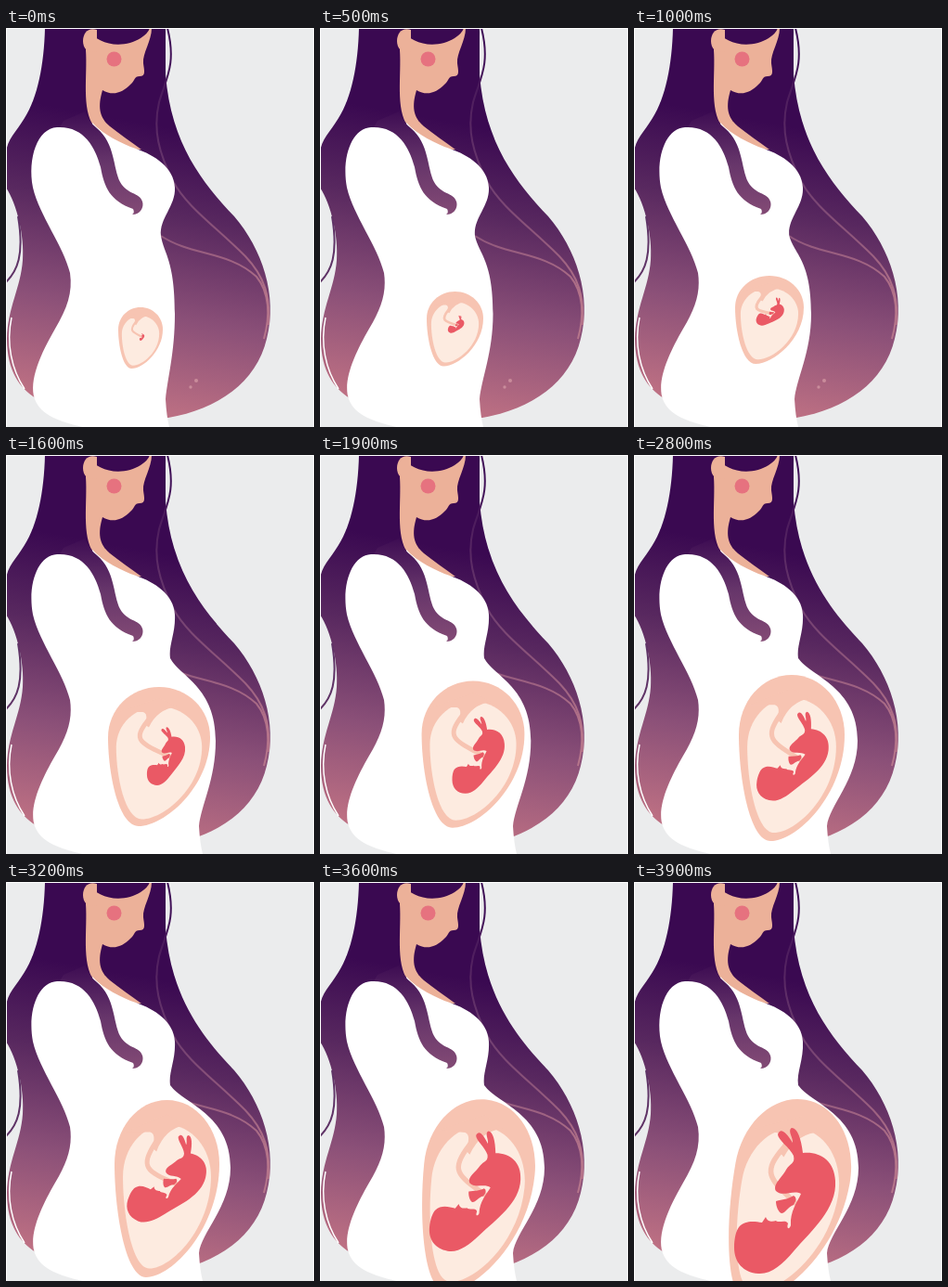
Write an HTML page that moves like this. It is 332x430 px and loops after 8 s.

```html
<!DOCTYPE html>
<html lang="en">
<head>
<meta charset="utf-8">
<title>Growing belly</title>
<style>
  html, body { margin: 0; width: 100%; height: 100%; overflow: hidden; background: #ebeced; }
  svg { display: block; width: 100%; height: 100%; }
</style>
</head>
<body>
<svg viewBox="0 0 332 430">
  <defs>
    <linearGradient id="hair" gradientUnits="userSpaceOnUse" x1="100" y1="70" x2="40" y2="395">
      <stop stop-color="#3a0951"/>
      <stop offset=".07" stop-color="#3a0951"/>
      <stop offset=".35" stop-color="#58285f"/>
      <stop offset=".68" stop-color="#8b5078"/>
      <stop offset="1" stop-color="#bd7083"/>
    </linearGradient>
    <linearGradient id="lock" gradientUnits="userSpaceOnUse" x1="0" y1="85" x2="0" y2="205">
      <stop stop-color="#3a0951"/>
      <stop offset=".5" stop-color="#66356a"/>
      <stop offset="1" stop-color="#854c76"/>
    </linearGradient>
    <linearGradient id="strand" gradientUnits="userSpaceOnUse" x1="0" y1="30" x2="0" y2="290">
      <stop stop-color="#3f0f56"/>
      <stop offset=".5" stop-color="#6b3a6e"/>
      <stop offset="1" stop-color="#b5748a"/>
    </linearGradient>
  </defs>

  <rect width="332" height="430" fill="#ebeced"/>

  <!-- hair behind the body -->
  <path fill="url(#hair)" d="M42 0C41 40 34 75 20 97C11 112 1 120 0 135V172C12 190 20 225 18 250C16 280 2 300 1 335C1 370 15 388 32 399L100 420H175C228 411 270 382 281 335C293 288 276 238 246 203C212 167 178 125 172 50V0Z"/>
  <g fill="none" stroke="url(#strand)" stroke-width="2">
    <path d="M174 0C184 40 172 55 165 80C158 110 165 135 180 165C195 193 225 213 258 246C279 268 285 290 283 320"/>
    <path d="M167 224C200 246 240 240 270 268C284 285 285 310 278 335"/>
    <path d="M13 203C20 245 12 262 0 274" stroke="#5f3366"/>
    <path d="M6 312C0 340 6 368 20 389" stroke="#fff" stroke-width="1.5"/>
  </g>
  <g fill="#c98c9b"><circle cx="205" cy="380" r="2"/><circle cx="199" cy="387" r="1.7"/></g>

  <!-- face and neck -->
  <path fill="#ecb199" d="M87 10L157 0C157 14 147 27 148 38C149 46 151 52 144 52C138 52 139 57 134 61C126 69 116 74 104 67C99 84 100 96 112 106C122 114 134 122 146 131L120 130L95 106C81 88 88 50 86 24Z"/>
  <path fill="#3a0951" d="M88 0C98 20 128 22 145 11Q153 6 155 0Z"/>
  <path fill="#ecb199" d="M98 2C89-1 83 5 83 14C83 24 91 28 98 25Z"/>
  <circle cx="116.500" cy="33.500" r="8" fill="#e6727f"/>

  <path id="dress" fill="#fff"/>
  <path fill="url(#lock)" d="M58 107C84 107 96 128 102 150C106 172 112 186 137 195Q139 199 136 201C145 201 149 193 147 187C144 177 131 180 123 166C115 150 118 125 98 108Q89 101 85 90L62 100Z"/>

  <path id="womb" fill="#f7c4b2"/>
  <path id="inner" fill="#fdebe0"/>
  <path id="root" fill="#f7c4b2"/>
  <path id="cord" fill="none" stroke="#f7c4b2" stroke-linecap="round"/>
  <g id="baby" fill="#ea5965">
    <path d="M113 372C120 364 130 366 138 367L142 361C144 367 150 366 153 365C155 368 164 363 166 368C164 375 168 374 169 370C168 355 176 345 180 336C172 331 160 340 153 333C149 326 160 318 164 310C168 303 174 304 172 295C168 286 155 278 155 272C158 264 164 270 171 281C172 276 165 268 170 265C176 265 180 276 182 292C200 290 216 300 217 322C219 352 192 375 172 398C160 412 148 423 134 422C118 421 108 410 108 394C108 384 110 376 113 372Z"/>
    <path d="M153 344C160 342 166 342 172 338Q177 340 172 348C166 350 163 357 159 357C156 356 153 350 153 344Z"/>
  </g>

  <path stroke="#fff" fill="none" d="M.5 430V.5H331.500V430"/>
</svg>
<script>
const LOOP = 8000, STEP = 100;

// womb: left, top, right, bottom; head and rump place the baby; belly is the dress's widest x.
const stages = [
  { time: 0,    womb: [121, 301, 169, 367], tilt: 0,  head: [145, 335.5], rump: [149, 331], belly: 182 },
  { time: 1000, womb: [109, 267, 183, 362], tilt: 0,  head: [137, 314],   rump: [162, 303], belly: 191 },
  { time: 1600, womb: [110, 250, 220, 400], tilt: 0,  head: [161, 345],   rump: [191, 308], belly: 226 },
  { time: 2300, womb: [109, 235, 221, 404], tilt: 0,  head: [146, 357],   rump: [204, 295], belly: 229 },
  { time: 2800, womb: [113, 237, 227, 416], tilt: 0,  head: [147, 354],   rump: [209, 307], belly: 241 },
  { time: 3200, womb: [117, 235, 230, 426], tilt: 0,  head: [146, 347],   rump: [216, 307], belly: 242 },
  { time: 3900, womb: [103, 233, 228, 457], tilt: 10, head: [131, 394],   rump: [213, 305], belly: 242 }
];
const END = stages.at(-1);

const byId = id => document.getElementById(id);
const setPath = (id, d) => byId(id).setAttribute("d", d);
const clamp = x => Math.max(0, Math.min(1, x));
const mix = (a, b, k) => Array.isArray(a) ? a.map((n, i) => mix(n, b[i], k)) : a + (b - a) * k;

function stageAt(time) {
  const i = Math.max(1, stages.findIndex(s => s.time >= time));
  const a = stages[i - 1], b = stages[i], k = (time - a.time) / (b.time - a.time);
  return Object.fromEntries(Object.keys(a).map(key => [key, mix(a[key], b[key], k)]));
}

// Maps the unit square onto the tilted box of the womb.
function boxMap([left, top, right, bottom], tilt) {
  const w = right - left, h = bottom - top, angle = tilt * Math.PI / 180;
  const cos = Math.cos(angle), sin = Math.sin(angle);
  return (u, v) => {
    const x = (u - .5) * w, y = (v - .5) * h;
    return [left + w / 2 + x * cos - y * sin, top + h / 2 + x * sin + y * cos];
  };
}

const egg = at => `M${at(.5, 0)}C${at(.78, 0)} ${at(1, .16)} ${at(1, .36)}
  C${at(1, .72)} ${at(.55, 1)} ${at(.3, 1)}C${at(.1, 1)} ${at(0, .62)} ${at(0, .36)}
  C${at(0, .16)} ${at(.22, 0)} ${at(.5, 0)}Z`;

function dress(belly) {
  const spread = clamp((belly - 190) / 35);
  const waist = 167 + 10 * spread, waistY = 224 - 5 * spread, hem = 175 + 36 * spread;
  return `M55 107H93V102C105 115 125 125 140 130C160 137 181 150 182 172
    C183 192 ${waist - 2} 205 ${waist} ${waistY}
    C${mix(waist, belly, .22)} ${waistY + 20} ${belly} 250 ${belly} 308
    C${belly} 350 ${hem - 1} 378 ${hem - 3} 400Q${hem - 2} 418 ${hem + 1} 430
    H82C58 424 38 418 31 400C24 380 38 350 53 324C66 302 72 285 69 264
    C62 235 36 202 29 172C23 140 34 108 55 107Z`;
}

// Turn and scale that carry the drawn head and rump to the wanted ones.
function placeBaby(head, rump) {
  const [dx, dy] = END.head.map((n, i) => END.rump[i] - n);
  const [x, y] = head.map((n, i) => rump[i] - n), square = dx * dx + dy * dy;
  const a = (x * dx + y * dy) / square, b = (y * dx - x * dy) / square;
  byId("baby").setAttribute("transform", `matrix(${[a, b, -b, a, ...head]}) translate(${END.head.map(n => -n)})`);
  return (u, v) => [head[0] + a * u - b * v, head[1] + b * u + a * v];
}

function draw(now) {
  const time = Math.min(Math.floor(now % LOOP / STEP) * STEP, END.time);
  const { womb, tilt, head, rump, belly } = stageAt(time);
  const at = boxMap(womb, tilt);
  const navel = placeBaby(head, rump)(43, -48);

  setPath("dress", dress(belly));
  setPath("womb", egg(at));
  setPath("inner", egg((u, v) => at(.08 + .84 * u, .14 + .81 * v)));
  setPath("root", `M${at(.1, .18)}L${at(.34, .18)}Q${at(.4, .19)} ${at(.36, .27)}
    L${at(.4, .29)}Q${at(.48, .16)} ${at(.68, .14)}L${at(.5, .08)}Z`);
  setPath("cord", `M${at(.39, .24)}C${at(.24, .38)} ${at(.3, .4)} ${navel}`);
  byId("cord").setAttribute("stroke-width", (womb[2] - womb[0]) * .045);
}

const start = performance.now();
function tick() {
  draw(performance.now() - start);
  requestAnimationFrame(tick);
}
tick();
</script>
</body>
</html>
```
